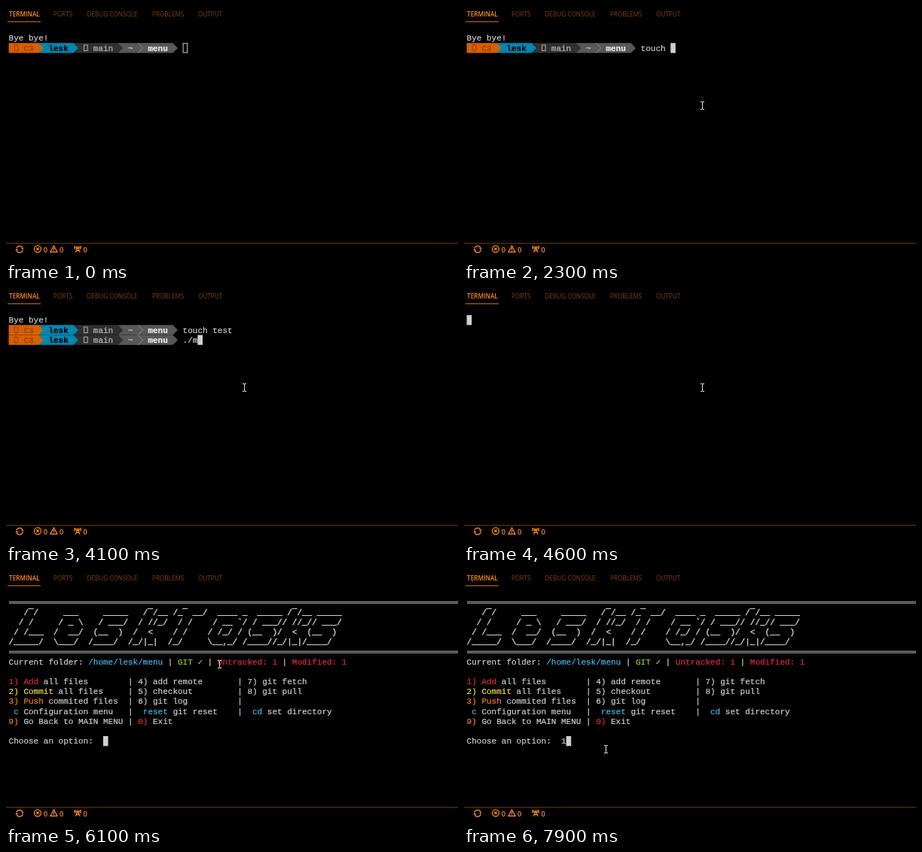
Animation of 600 by 338 pixels, one loop 8000 ms. Source, as an HTML page:

```html
<!DOCTYPE html>
<html lang="en">
<head>
<meta charset="utf-8">
<title>Terminal menu</title>
<style>
html, body { margin: 0; width: 100%; height: 100%; overflow: hidden; background: #000; }
svg { display: block; width: 600px; height: 338px; }
text { white-space: pre; }
.mono { font: 11px "Liberation Mono", "DejaVu Sans Mono", monospace; stroke-width: .2; }
#banner { stroke-width: .4; }
.ui { font: 500 8.2px "Open Sans", "Noto Sans", sans-serif; }
.ui .active { font-weight: 600; fill: #ff8c1a; }
.count { font: 600 9.5px "Open Sans", "Noto Sans", sans-serif; fill: #ff8a1f; }
.icon { fill: none; stroke: #ff8a1f; stroke-width: 1.3; }
</style>
</head>
<body>
<svg id="stage" viewBox="0 0 600 338" xml:space="preserve">
  <defs><clipPath id="clip"><rect id="clipBox" x="280.8" y="115" width="0" height="14"/></clipPath></defs>
  <rect width="600" height="338"/>

  <g class="ui" fill="#7d4310">
    <text x="4" y="14.4" class="active">TERMINAL</text>
    <text x="63" y="14.4">PORTS</text>
    <text x="107.5" y="14.4">DEBUG CONSOLE</text>
    <text x="194" y="14.4">PROBLEMS</text>
    <text x="255" y="14.4">OUTPUT</text>
  </g>
  <rect x="2" y="20.4" width="44" height="1" fill="#e87a10"/>

  <rect y="315.4" width="600" height="1" fill="#7a3f0c"/>
  <g class="icon">
    <path d="M14 322.4A4.2 4.2 0 0 1 22 322.2M22.2 325A4.2 4.2 0 0 1 14.2 325.4"/>
    <path d="M20 322.4h4l-2 2.4zM12.2 325.2h4l-2-2.4z" fill="#ff8a1f" stroke="none"/>
    <circle cx="42" cy="323.3" r="4.5"/>
    <path d="M40.2 321.5l3.6 3.6m0-3.6l-3.6 3.6"/>
    <path d="M63.5 319l4.5 8.3h-9z"/>
    <path d="M63.5 321.8v3m0 .8v1"/>
    <path d="M92.4 327.8l2.8-7 2.8 7m-4.6-2.5h3.7M91.8 319.100q-1.6 2.2 0 4.4M98.6 319.100q1.6 2.2 0 4.4M93.5 319.8q-.8 1.4 0 2.8M96.9 319.8q.8 1.4 0 2.8"/>
  </g>
  <g class="count">
    <text x="49.7" y="327.6">0</text><text x="71" y="327.6">0</text><text x="102.5" y="327.6">0</text>
  </g>

  <g id="shell" class="mono"></g>
  <g id="banner" class="mono"></g>
  <g id="menu" class="mono"></g>
  <g id="selection" class="mono" clip-path="url(#clip)"></g>
  <rect id="cursor"/>
  <path id="mouse" d="M-2.5-5h2m1 0h2M0-5V5M-2.5 5h2m1 0h2" fill="none" stroke="#e4e4e4"/>
</svg>
<script>
const NS = 'http://www.w3.org/2000/svg';
const $ = id => document.getElementById(id);
const LOOP = 8000, STEP = 100;
const CW = 6.6, LH = 13.21, LEFT = 3.6, TOP = 36.1;
const INK = '#d0d0d0', RED = '#e02844', BLUE = '#45b8ec', ORANGE = '#f57a28',
      YELLOW = '#f5e048', GREEN = '#8acb2c';
const colX = c => LEFT + c * CW;
const rowY = r => TOP + r * LH;

function add(parent, tag, attrs) {
  const el = document.createElementNS(NS, tag);
  for (const k in attrs) el.setAttribute(k, attrs[k]);
  return parent.appendChild(el);
}

function write(parent, col, row, str, fill = INK, bold = false) {
  const el = add(parent, 'text', { x: colX(col), y: rowY(row) + 10.2, fill, stroke: fill });
  if (bold) el.style.fontWeight = 700;
  el.textContent = str;
  return el;
}

// Consecutive coloured runs: [text, colour, text, colour, ...]
function runs(parent, col, row, parts) {
  for (let i = 0; i < parts.length; i += 2) {
    write(parent, col, row, parts[i], parts[i + 1]);
    col += parts[i].length;
  }
}

function prompt(parent, row) {
  const g = add(parent, 'g', {});
  const y = rowY(row), mid = y + LH / 2, end = y + LH;
  const segs = [[22, 33, '#585858'], [13, 22, '#303030'], [6, 13, '#0087af'], [0, 6, '#d75f00']];
  for (const [a, b, fill] of segs) {
    const x = colX(a), r = colX(b);
    add(g, 'path', { d: `M${x} ${y}H${r}L${r + CW} ${mid}L${r} ${end}H${x}z`, fill });
  }
  const x = colX(26);
  add(g, 'path', { d: `M${x} ${y}l${CW} ${LH / 2}l${-CW} ${LH / 2}`, fill: 'none', stroke: '#8c8c8c', 'stroke-width': 1 });
  for (const [c, stroke] of [[1, '#8a3f08'], [15, '#bcbcbc']])
    add(g, 'rect', { x: colX(c) + 1, y: y + 2.6, width: 4.6, height: 7.6, fill: 'none', stroke, 'stroke-width': .9 });
  write(g, 3, row, 'C3', '#8a3f08');
  write(g, 8, row, 'lesk', '#000', true);
  write(g, 17, row, 'main', '#bcbcbc');
  write(g, 24, row, '~', '#d0d0d0');
  write(g, 28, row, 'menu', '#eeeeee', true);
  return g;
}

// Shell screen
const shell = $('shell');
write(shell, 0, 0, 'Bye bye!');
prompt(shell, 1);
const secondPrompt = prompt(shell, 2);
const line1 = write(shell, 35, 1, '');
const line2 = write(shell, 35, 2, '');

// Slanted banner
const glyphs = {
  L: ['/‾/', '/ /', '/ /___', '/_____/'],
  e: ['___', '/ _ \\', '/  __/', '\\___/'],
  s: ['_____', '/ ___/', '(__  )', '/____/'],
  k: ['/‾/__', '/ //_/', '/  <', '/_/|_|'],
  T: ['/_‾ __/', '/ /', '/ /', '/_/'],
  a: ['____ _', '/ __ `/', '/ /_/ /', '\\__,_/']
};
const indent = { e: [2, 1, 0, 0], a: [2, 1, 0, 0], T: [1, 2, 1, 0] };
const starts = [0, 9, 16, 24, 32, 40, 47, 53, 59];
const banner = $('banner');
[...'LeskTasks'].forEach((ch, i) => glyphs[ch].forEach((str, r) =>
  write(banner, starts[i] + (indent[ch] || [3, 2, 1, 0])[r], r + 1, str)));
for (const y of [41.7, 43.7, 107.7, 109.7])
  add(banner, 'rect', { x: 4, y, width: 596, height: 1, fill: '#b4b4b4' });
runs($('banner'), 0, 6, ['Current folder: ', INK, '/home/lesk/menu', BLUE]);
for (const el of [...banner.querySelectorAll('text')].slice(-2)) el.style.strokeWidth = .2;

// Menu
const menu = $('menu');
runs(menu, 31, 6, [' | ', INK, 'GIT ', GREEN, '✓', GREEN, ' | ', INK]);
runs(menu, 42, 6, ['Untracked: 1', RED, ' | ', INK, 'Modified: 1', RED]);
const items = [
  ['1) Add', RED, ' all files', '4) add remote', '7) git fetch'],
  ['2) Commit', YELLOW, ' all files', '5) checkout', '8) git pull'],
  ['3) Push', ORANGE, ' commited files', '6) git log', ''],
  [' c', BLUE, ' Configuration menu', '', ''],
  ['9)', ORANGE, ' Go Back to MAIN MENU', '', '']
];
items.forEach(([key, color, rest, second, third], i) => {
  const row = 8 + i;
  runs(menu, 0, row, [key, color, rest, INK]);
  write(menu, 24, row, '|');
  if (i < 4) write(menu, 46, row, '|');
  write(menu, 26, row, second);
  write(menu, 48, row, third);
});
runs(menu, 27, 11, ['reset', BLUE, ' git reset', INK]);
runs(menu, 49, 11, ['cd', BLUE, ' set directory', INK]);
runs(menu, 26, 12, ['0)', RED, ' Exit', INK]);
write(menu, 0, 14, 'Choose an option:');
const answer = write(menu, 19, 14, '');

const selection = $('selection');
add(selection, 'rect', { x: 280, y: 115, width: 200, height: 15, fill: '#5c85c8' });
write(selection, 42, 6, 'Untracked: 1 | Modified: 1', '#38508a');

// Timeline tables
const typed1 = [[0, ''], [1600, 't'], [1700, 'to'], [1900, 'tou'], [2000, 'touc'], [2100, 'touch'],
  [2300, 'touch '], [2500, 'touch te'], [2700, 'touch tes'], [2800, 'touch test']];
const typed2 = [[0, ''], [4000, './'], [4100, './m'], [4200, './menu.sh']];
const typed3 = [[0, ''], [7800, '1']];
const path = [[800, 316, 132], [5300, 316, 132], [6200, 282, 125], [6300, 284, 125], [6800, 471, 128],
  [6900, 473, 128], [7100, 184, 230], [7400, 185, 232], [7500, 185, 232], [7800, 188, 238], [8000, 188, 238]];

const at = (table, t) => table.filter(s => s[0] <= t).pop()[1];
const show = (el, on) => { el.style.display = on ? '' : 'none'; };

function mouseAt(t) {
  const i = Math.max(1, path.findIndex(p => p[0] >= t));
  const [t0, x0, y0] = path[i - 1], [t1, x1, y1] = path[i];
  const u = Math.max(0, (t - t0) / (t1 - t0)), e = u * u * (3 - 2 * u);
  return [x0 + (x1 - x0) * e, y0 + (y1 - y0) * e];
}

function cursorAt(t) {
  if (t < 3200) return [35 + at(typed1, t).length, 1];
  if (t < 3400) return [0, 2];
  if (t < 4600) return [35 + at(typed2, t).length, 2];
  if (t < 4700) return [0, 0];
  if (t < 4800) return [31, 6];
  return [19 + at(typed3, t).length, 14];
}

function draw(t) {
  show(shell, t < 4600);
  show(secondPrompt, t >= 3400);
  show(banner, t >= 4700);
  show(menu, t >= 4800);
  line1.textContent = at(typed1, t);
  line2.textContent = at(typed2, t);
  answer.textContent = at(typed3, t);

  const [col, row] = cursorAt(t), hollow = t < 900, inset = hollow ? .5 : 0;
  const cursor = $('cursor');
  cursor.setAttribute('x', colX(col) + inset);
  cursor.setAttribute('y', rowY(row) + inset);
  cursor.setAttribute('width', CW - 2 * inset);
  cursor.setAttribute('height', LH - 2 * inset);
  cursor.setAttribute('fill', hollow ? 'none' : INK);
  cursor.setAttribute('stroke', hollow ? INK : 'none');

  const [mx, my] = mouseAt(t);
  show($('mouse'), t >= 800);
  $('mouse').setAttribute('transform', `translate(${Math.round(mx) + .5} ${Math.round(my) + .5})`);

  show(selection, t >= 6300 && t < 7200);
  const reach = t < 6900 ? mx : 471;
  $('clipBox').setAttribute('width', Math.max(0, Math.round((reach - 280.8) / CW)) * CW);
}

const begin = performance.now();
function tick() {
  const t = (performance.now() - begin) % LOOP;
  draw(Math.floor(t / STEP) * STEP);
  requestAnimationFrame(tick);
}
tick();
</script>
</body>
</html>
```
